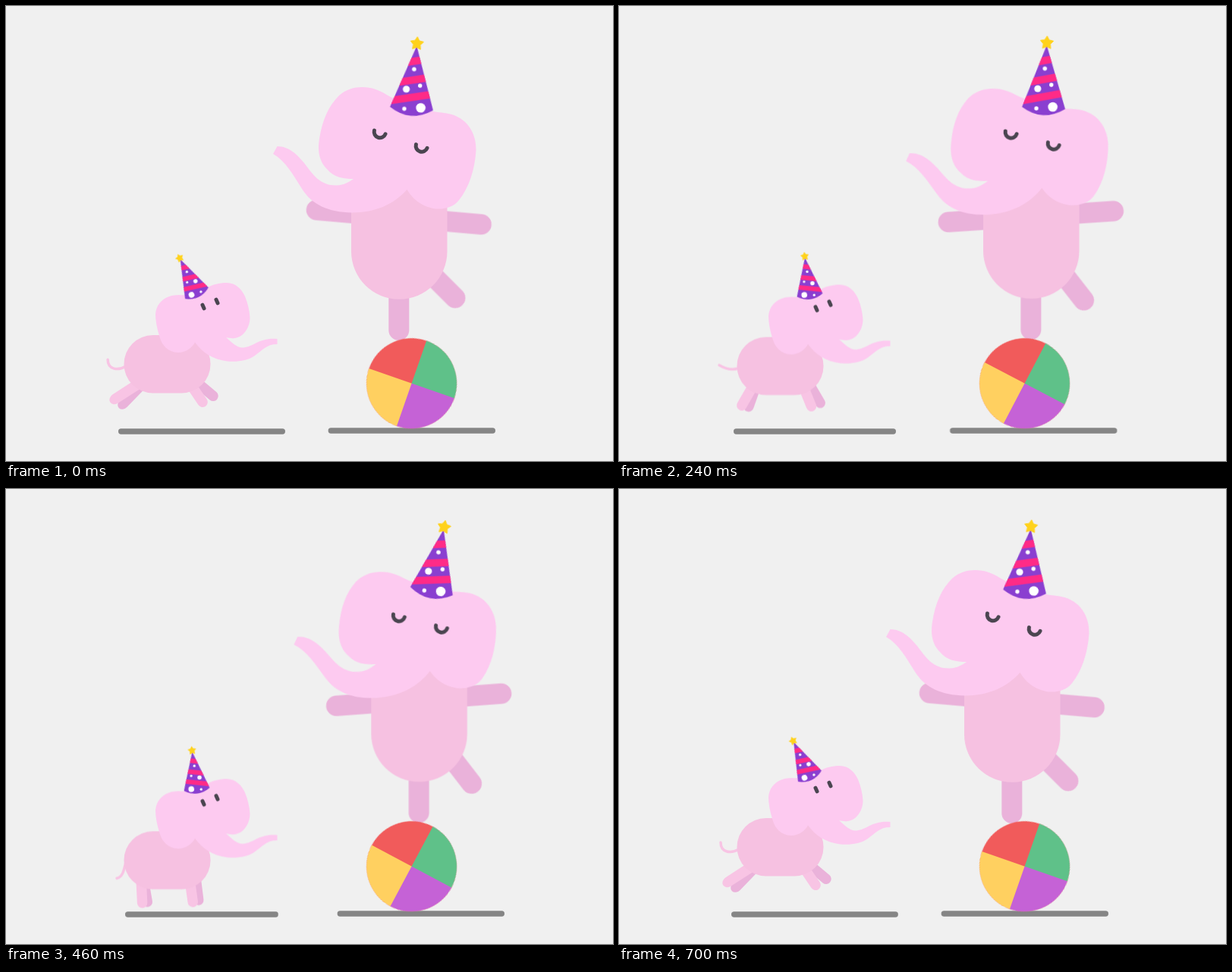
Recreate the animation shown at these times as an HTML page without scripts. Size 800 by 600 pixels, loop 0.72 s.

```html
<!DOCTYPE html>
<html lang="en">
<head>
<meta charset="utf-8">
<title>Dancing elephants</title>
<style>
  html, body { margin: 0; width: 100%; height: 100%; overflow: hidden; background: #f0f0f0; }
  svg { display: block; width: 100%; height: 100%; }

  .head { fill: #fdcaf0; }
  .body { fill: #f6c1e1; }
  .limb { stroke: #eab2da; stroke-linecap: round; stroke-width: 27; }
  .leg { stroke: #f8c4e4; stroke-linecap: round; stroke-width: 13.5; }
  .leg.far { stroke: #eab2da; }
  .tail { fill: none; stroke: #f8c4e4; stroke-width: 3.5; stroke-linecap: round; }
  .eye { fill: none; stroke: #4a4550; stroke-width: 5; stroke-linecap: round; }
  .ground { stroke: #858585; stroke-width: 7.4; stroke-linecap: round; }

  /* Balancing elephant: one sway drives everything but the hat */
  .sway, .roll, .slide, .nod, .tilt, .kick {
    animation: .36s cubic-bezier(.73, 0, .27, 1) infinite alternate;
  }
  .sway { animation-name: sway; }
  .slide { animation-name: slide; }
  .roll { animation-name: roll; }
  .nod { animation-name: nod; transform-origin: 511px 184px; }
  .tilt { animation-name: tilt; }
  .kick { animation-name: kick; }
  .bob { animation: bob .36s infinite; }
  .hat-big { animation: hat-big .36s cubic-bezier(.37, 0, .63, 1) -.575s infinite alternate; }

  @keyframes sway { to { transform: translateX(28.5px); } }
  @keyframes slide { to { transform: translateX(13px); } }
  @keyframes roll { from { transform: rotate(19.2deg); } to { transform: rotate(28.8deg); } }
  @keyframes nod { to { transform: rotate(-4.25deg); } }
  @keyframes tilt { from { transform: rotate(5deg); } to { transform: rotate(-5deg); } }
  @keyframes kick { from { transform: rotate(45deg); } to { transform: rotate(53deg); } }
  @keyframes bob {
    0%, 100% { transform: none; animation-timing-function: ease-in; }
    50% { transform: translateY(-1.6px); animation-timing-function: ease-out; }
  }
  @keyframes hat-big { from { transform: rotate(1.2deg); } to { transform: rotate(11.5deg); } }

  /* Running elephant */
  .bounce { animation: bounce .36s cubic-bezier(.8, 0, .2, 1) infinite; }
  .shadow { animation: shadow .36s infinite; }
  .leg { animation: swing .36s infinite; }
  .leg.back { animation: swing .36s infinite, stretch .72s infinite; }
  .tail { animation: wag .36s linear infinite; }
  .hat-small { animation: hat-small .36s ease infinite alternate; }

  @keyframes bounce {
    0%, 84%, 100% { transform: none; }
    37.5% { transform: translateY(18.2px); }
  }
  @keyframes shadow {
    0%, 100% { transform: none; animation-timing-function: ease-in-out; }
    29% { transform: scaleX(.917); animation-timing-function: cubic-bezier(.4, .15, .5, 1); }
  }
  @keyframes swing {
    0%, 92%, 100% { rotate: var(--out); animation-timing-function: ease-in-out; }
    29% { rotate: var(--in); animation-timing-function: cubic-bezier(.5, 0, .7, 1); }
  }
  @keyframes stretch {
    0%, 95%, 100% { scale: 1 1.24; }
    14%, 75% { scale: 1 1; }
  }
  @keyframes wag {
    0%, 94%, 100% { d: path("M158 475C148 481 134 480 134 466"); }
    28% { d: path("M158 474C156 482 155 494 146 496"); }
    50% { d: path("M158 474C150 473 146 477 140 487"); }
    67% { d: path("M158 475C150 478 142 477 132 471"); }
  }
  @keyframes hat-small { from { transform: rotate(-26deg); } to { transform: rotate(-6deg); } }
</style>
</head>
<body>
<svg viewBox="0 0 800 600">
  <defs>
    <clipPath id="cone"><path d="M0-83L28.5 0Q0 19-28.5 0Z"/></clipPath>
    <g id="hat">
      <g clip-path="url(#cone)">
        <path fill="#8a3fd0" d="M-30-90H30V20H-30Z"/>
        <path stroke="#ff2b87" stroke-width="10" d="M-30-8L30-22M-30-31L30-45M-30-56L30-70"/>
      </g>
      <g fill="#fff">
        <circle cx="-.9" cy="-52" r="2.8"/>
        <circle cx="-9" cy="-25" r="4.6"/>
        <circle cx="8.7" cy="-31" r="2.7"/>
        <circle cx="-9.5" cy="1" r="2.7"/>
        <circle cx="12" cy="-2" r="6.3"/>
      </g>
      <path fill="#ffd21c" stroke="#ffd21c" stroke-linejoin="round" transform="translate(0 -86)"
        d="M0-9L2.9-4L8.6-2.8L4.7 1.5L5.3 7.3L0 4.9L-5.3 7.3L-4.7 1.5L-8.6-2.8L-2.9-4Z"/>
    </g>
  </defs>

  <!-- Running elephant -->
  <g transform="translate(258 561)"><path class="ground shadow" d="M-106.3 0H106.3"/></g>
  <g class="bounce">
    <path class="tail" d="M158 475C148 481 134 480 134 466"/>
    <g transform="translate(181 497)"><path class="leg far back" style="--out:44deg;--in:-10deg" d="M0 0V30.5"/></g>
    <g transform="translate(250 495)"><path class="leg far" style="--out:-50deg;--in:-7deg" d="M0 0V30"/></g>
    <g transform="translate(178 496)"><path class="leg back" style="--out:57deg;--in:-3deg" d="M0 0V32.5"/></g>
    <g transform="translate(242 497)"><path class="leg" style="--out:-34deg;--in:-8deg" d="M0 0V30.5"/></g>
    <rect class="body" x="155.5" y="434" width="114" height="76.5" rx="38"/>
    <path class="head" d="M228 381C238 382 253 379 264 372C273 367 281 365 291 365C303 365 311 374 315 383
      C319 393 321 402 321.5 411C321.5 424 313 437 301 438C298 438.5 294 438 290 437C297 443 304 451 313 450.5
      C327 449 334 437 357.5 439V446C343 446 338 454 328 461C318 468 305 469.5 292 468.5C272 466 259 457 249 443.5
      C246 450 237 457 227 457C213 456.5 205 447 202 435C199 425 197 415 197 407C198 392 209 381 228 381Z"/>
    <path class="eye" d="M259 394.2L261 398.8M277 387.2L279 391.8"/>
    <g transform="translate(251.5 378.8)"><g class="hat-small"><use href="#hat" transform="scale(-.6 .6)"/></g></g>
  </g>

  <!-- Balancing elephant -->
  <path class="ground slide" d="M428.3 560H641.3"/>
  <g class="sway">
    <g class="bob">
      <g transform="translate(517.8 278.5)"><path class="limb tilt" d="M-109 0H109"/></g>
      <g transform="translate(558 351)"><path class="limb kick" d="M0 0H48"/></g>
      <path class="limb" d="M517.8 360V427.5"/>
      <path class="body" d="M455 240H581.5V323.5A63.25 63.25 0 0 1 455 323.5Z"/>
      <g class="nod">
        <path class="head" d="M471 107C488 107 499 116 511 122L563 139C575 141 581 141 583 142
          C608 147 620 168 619.5 190C618 216 610 240 597 256C588 268 569 270 556 265C542 260 533 250 528.5 242
          C512 261 487 272.5 456 272.5C425 272 403 262 390 241C378 222 369 205 352 195L357.5 185
          C373 185 384 196 393 207C405 223 414 237 436 236.5C446 236 452 232 458 228C445 228 432 226 423 215
          C411 203 411 187 413 175C417 150 425 132 439 118C449 109 461 106.5 471 107Z"/>
        <path class="eye" d="M485.4 164.1A7.7 7.7 0 0 0 500 168.9M540.4 182.6A7.7 7.7 0 0 0 555 187.4"/>
      </g>
      <g transform="translate(534.5 135.3)"><g class="hat-big"><use href="#hat"/></g></g>
    </g>
  </g>
  <g transform="translate(534.6 497.6)">
    <g class="roll">
      <circle r="59.5" fill="#f15b5b"/>
      <path fill="#5fc189" d="M0 0V-59.5A59.5 59.5 0 0 1 59.5 0Z"/>
      <path fill="#c562d6" d="M0 0H59.5A59.5 59.5 0 0 1 0 59.5Z"/>
      <path fill="#ffd060" d="M0 0V59.5A59.5 59.5 0 0 1-59.5 0Z"/>
    </g>
  </g>
</svg>
</body>
</html>
```
